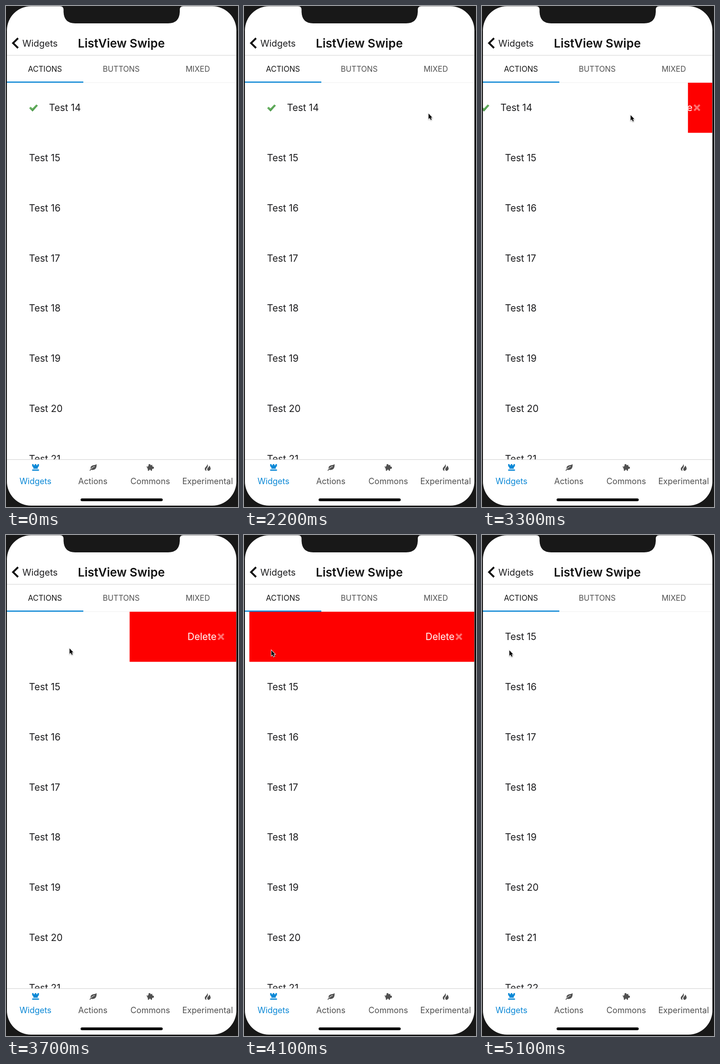
Recreate the animation shown at these times as an HTML page with a canvas. Size 510 by 1097 pixels, loop 6000 ms.

```html
<!DOCTYPE html>
<html lang="en">
<head>
<meta charset="utf-8">
<title>ListView Swipe</title>
<style>
  html, body { margin: 0; width: 100%; height: 100%; overflow: hidden; background: #181818; }
  canvas { display: block; width: 510px; height: 1097px; }
</style>
</head>
<body>
<canvas id="stage"></canvas>
<script>
const W = 510, H = 1097, LOOP = 6000, STEP = 100;
const LEFT = 2, RIGHT = 506.5, TOP = 168, BOTTOM = 993, ROW = 109.85;
const BLUE = '#0b88d6', GREY = '#505050', INK = '#1c1c1e';
const FONT = 'Inter, "Open Sans", sans-serif';

const canvas = document.getElementById('stage');
const ctx = canvas.getContext('2d');
const ratio = window.devicePixelRatio || 1;
canvas.width = W * ratio;
canvas.height = H * ratio;

// Keys are [time, value] pairs, joined by straight lines.
const POINTER_X = [[2800, 405], [2900, 403], [3000, 396], [3100, 380], [3200, 356],
  [3300, 326], [3500, 235], [3700, 139], [3800, 103], [3900, 75], [4000, 61], [4100, 59.5]];
const SLIDE = [[3050, 0], [3100, 4], [3200, 26], [3300, 54], [3500, 142], [3700, 235],
  [3800, 270], [3900, 297], [4000, 410], [4100, 495], [4200, 504.5]];
const COLLAPSE = [[4200, 0], [4300, 3], [4400, 23], [4500, 57], [4600, ROW]];

function at(keys, t) {
  if (t <= keys[0][0]) return keys[0][1];
  for (let i = 1; i < keys.length; i++) {
    const [t0, a] = keys[i - 1], [t1, b] = keys[i];
    if (t <= t1) return a + (b - a) * (t - t0) / (t1 - t0);
  }
  return keys[keys.length - 1][1];
}

function text(str, x, y, size, color, align = 'left', weight = 400) {
  ctx.font = `${weight} ${size}px ${FONT}`;
  ctx.fillStyle = color;
  ctx.textAlign = align;
  ctx.fillText(str, x, y);
}

function rect(x, y, w, h, color) {
  ctx.fillStyle = color;
  ctx.fillRect(x, y, w, h);
}

function shape(d, color) {
  ctx.fillStyle = color;
  ctx.fill(new Path2D(d));
}

function line(d, width, color) {
  ctx.lineWidth = width;
  ctx.strokeStyle = color;
  ctx.stroke(new Path2D(d));
}

function clipped(x, y, w, h, draw) {
  ctx.save();
  ctx.beginPath();
  ctx.rect(x, y, w, h);
  ctx.clip();
  draw();
  ctx.restore();
}

function moved(x, y, draw) {
  ctx.save();
  ctx.translate(x, y);
  draw();
  ctx.restore();
}

function header() {
  line('M26.5 70.5L15.5 81.2L26.5 92', 4, '#0a0a0a');
  text('Widgets', 36, 88.5, 20, INK);
  text('ListView Swipe', 253.5, 91, 26, '#101010', 'center', 600);
  rect(LEFT, 107.5, RIGHT - LEFT, 1, '#cfcfcf');
  text('ACTIONS', 85.7, 144, 16.8, '#161616', 'center');
  text('BUTTONS', 253.3, 144, 16.8, GREY, 'center');
  text('MIXED', 421.6, 144, 16.8, GREY, 'center');
  rect(LEFT, 167.3, RIGHT - LEFT, 1, '#efefef');
  rect(LEFT, 165.4, 168, 2.6, BLUE);
}

function checkMark() {
  const green = ctx.createLinearGradient(51, 215, 62, 231);
  green.addColorStop(0, '#83c878');
  green.addColorStop(1, '#4b9a49');
  shape('M51 223.6L54.2 220.4L58.2 224.2L66.6 215.4L70 218L58.4 231Z', green);
  line('M51.6 223.8L58.4 230.4L69.4 218.2', 0.9, '#478f46');
}

function list(slide, shift) {
  clipped(LEFT, TOP, RIGHT - LEFT, BOTTOM - TOP, () => {
    const edge = RIGHT - slide;
    clipped(edge, TOP, slide, ROW - shift, () => {
      rect(edge, TOP, slide, ROW, '#fe0000');
      text('Delete', 399, 230, 21, '#fff');
      line('M466.5 216.5L478.5 228.8M478.5 216.5L466.5 228.8', 4, '#ff6e6e');
    });
    if (slide < RIGHT) clipped(LEFT, TOP, edge - LEFT, ROW, () => moved(-slide, 0, () => {
      checkMark();
      text('Test 14', 94.5, 230, 21, INK);
    }));
    for (let i = 1; i < 9; i++) {
      text('Test ' + (14 + i), 50.5, 230 + ROW * i - shift, 21, INK);
    }
  });
}

function rook() {
  shape('M57.5 1003H60.6V1005.6H63.2V1003H66.6V1005.6H69.3V1003H72.4V1007.5L69.8 1010.3V1013.2H60.2V1010.3L57.5 1007.5Z', BLUE);
  rect(57.5, 1014.8, 15, 2.8, BLUE);
}

function leaf() {
  shape('M199 1003C200 1011 196.5 1017.6 187.2 1015.5C183.3 1008 189.5 1005.6 194 1005.3Q197.5 1005 199 1003Z', GREY);
  line('M195 1008.5Q190.5 1009 186.5 1014', 1.1, '#fff');
  line('M187.5 1013.2L184.2 1017.6', 1.6, GREY);
}

function pig() {
  shape('M309 1008L311.2 1009Q313 1006 317 1006L321.5 1004.4V1007.2L323 1009H325V1013H322.8L321 1014.5V1017.5H318V1015.6H314.8V1017.5H311.8V1014Q310.4 1012.5 310.5 1010.4L309 1009.6Z', GREY);
  ctx.beginPath();
  ctx.arc(315.5, 1005.3, 2.3, 0, Math.PI * 2);
  ctx.fill();
}

function fire() {
  shape('M442.3 1002.5C443.8 1007 437 1009.4 437 1013.4Q437 1017 440.8 1018Q439 1014 442.3 1011Q445.2 1007 442.3 1002.5Z', GREY);
  shape('M446.8 1006C446.8 1010 441.8 1011.3 442.4 1014.8Q442.8 1017.3 444.8 1018C448.5 1017.3 450 1015 449.8 1012.3Q449.3 1008.8 446.8 1006Z', GREY);
}

function tabBar() {
  rect(LEFT, BOTTOM, RIGHT - LEFT, H - BOTTOM, '#fff');
  rect(LEFT, 992.6, RIGHT - LEFT, 1, '#cacaca');
  rook();
  leaf();
  pig();
  fire();
  ['Widgets', 'Actions', 'Commons', 'Experimental'].forEach((name, i) =>
    text(name, 64.8 + 126.1 * i, 1046.5, 18.1, i ? GREY : BLUE, 'center'));
  ctx.fillStyle = '#000';
  ctx.beginPath();
  ctx.roundRect(164, 1078.3, 180.5, 6, 3);
  ctx.fill();
}

function bezel() {
  const frame = new Path2D();
  frame.rect(0, 0, W, H);
  frame.roundRect(LEFT, 0.5, RIGHT - LEFT, 1093.5, 53);
  ctx.fillStyle = '#181818';
  ctx.fill(frame, 'evenodd');
  shape('M119 0Q126.5 1 126.5 8V13Q127.5 38 152 38H356.5Q381 38 382 13V8Q382 1 389.5 0Z', '#181818');
  rect(0, 54, 1.5, 988, '#080808');
  rect(507.5, 54, 2.5, 988, '#080808');
}

function pointer(t) {
  if (t < 1700) return;
  let x, y;
  if (t < 2200) {
    const rest = (1 - (t - 1700) / 500) ** 1.5;
    x = 405 + 62 * rest;
    y = 235 + 34 * rest;
  } else {
    x = at(POINTER_X, t);
    y = 235 + 17 * ((405 - x) / 345.5) ** 1.1;
  }
  moved(x + 0.7, y + 0.6, () => {
    const arrow = 'M0 0V11.8L2.7 9.3L4.8 13.9L6.9 13L4.9 8.6H8.2Z';
    ctx.shadowColor = 'rgba(0,0,0,.35)';
    ctx.shadowBlur = 2 * ratio;
    ctx.shadowOffsetY = ratio;
    line(arrow, 1.8, '#fff');
    ctx.shadowColor = 'transparent';
    shape(arrow, '#000');
  });
}

function draw(t) {
  ctx.setTransform(ratio, 0, 0, ratio, 0, 0);
  rect(0, 0, W, H, '#fff');
  header();
  list(at(SLIDE, t), at(COLLAPSE, t));
  tabBar();
  bezel();
  pointer(t);
}

const start = performance.now();
function tick() {
  const t = (performance.now() - start) % LOOP;
  draw(Math.floor(t / STEP) * STEP);
  requestAnimationFrame(tick);
}
tick();
</script>
</body>
</html>
```
